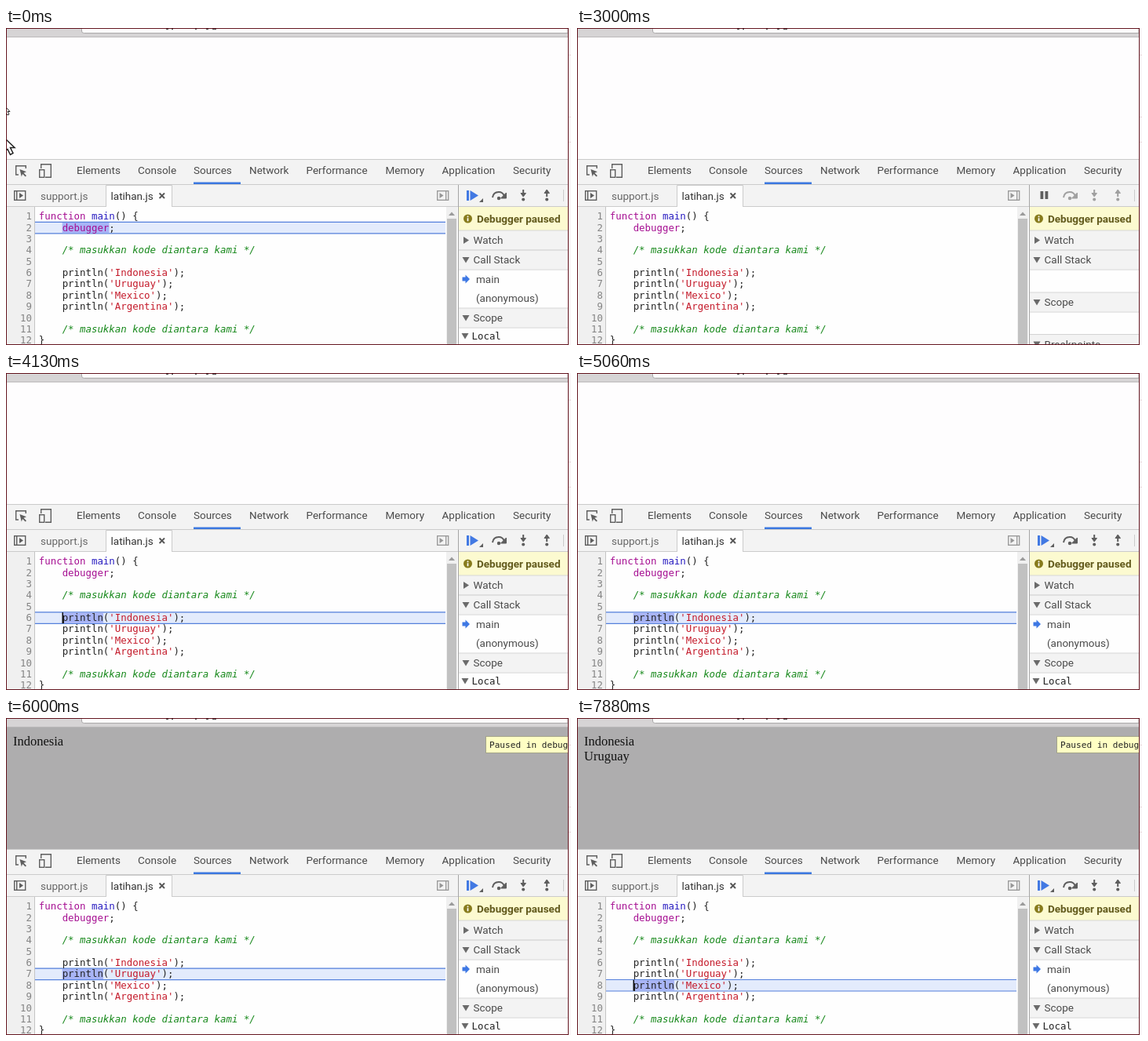
These frames come from a looping animation (720 px wide and 404 px high, 8000 ms). An HTML page:

```html
<!DOCTYPE html>
<html lang="id">
<head>
<meta charset="utf-8">
<title>Debugger stepping</title>
<style>
html, body { margin: 0; width: 100%; height: 100%; overflow: hidden; background: #fff; }
svg { display: block; width: 720px; height: 404px; }
text { white-space: pre; }
.ui { font: 13.5px Roboto, sans-serif; fill: #4a4a4a; }
.code { font: 12.4px "DejaVu Sans Mono", monospace; fill: #222; }
.page { font: 16.5px "Liberation Serif", serif; fill: #111; }
.num { fill: #848484; text-anchor: end; }
.key { fill: #a50d91; }
.def { fill: #261ac0; }
.str { fill: #c41a2a; }
.note { fill: #16881a; font-style: italic; }
</style>
</head>
<body>
<svg viewBox="0 0 720 404">
  <defs><clipPath id="window"><rect width="716" height="404"/></clipPath></defs>
  <rect width="720" height="404" fill="#fdfbfc"/>
  <path d="M717 34.5h3M717 113.5h3M717 145.5h3" stroke="#ead9dc"/>
  <g clip-path="url(#window)">
    <rect id="page" y="11" width="716" height="156"/>
    <rect width="716" height="12" fill="#d6d4d5"/>
    <path d="M96.500 0V4q0 2.500 3 2.500H716V0Z" fill="#fefefe" stroke="#aaa8a9"/>
    <path d="M0 11.500H716" stroke="#bcbabb"/>
    <path d="M204 1.500h3M211 1.500h2M241 1.500h2M255 1.500h3M263 1.500h5" stroke="#555" stroke-width="1.500"/>
    <g id="output" class="page"></g>
    <g id="notice">
      <rect x="611.500" y="23.500" width="130" height="21" fill="#ffffc4" stroke="#a4a48a"/>
      <text class="code" x="616" y="38" style="font-size:11.100px">Paused in debugger</text>
    </g>

    <rect y="167" width="716" height="61" fill="#f3f3f3"/>
    <path d="M0 167.500H716M0 199.500H716M0 227.500H716" stroke="#cbcbcb"/>
    <g id="tabs" class="ui"></g>
    <rect x="239" y="196.500" width="60" height="2.500" fill="#3b78e0"/>
    <g fill="none" stroke="#5e5e5e" stroke-width="1.400">
      <path d="M16 187h-3.300V175.700H25.300V179"/>
      <path d="M17.500 180l8.500 3.300-3.500 1.400 3.500 3.600-1.300 1.300-3.600-3.600-1.300 3.400z" fill="#5e5e5e" stroke="none"/>
      <path d="M44.700 179V173.700H57.300V190.300H50"/>
      <rect x="42.700" y="180.700" width="6" height="9.600" fill="#f3f3f3"/>
      <rect x="10.700" y="207.700" width="14" height="11.600"/>
      <path d="M13.700 208v11"/><path d="M17 210l5 3.500-5 3.500z" fill="#5e5e5e" stroke="none"/>
    </g>
    <g fill="none" stroke="#969696" stroke-width="1.300">
      <rect x="549.700" y="207.700" width="14" height="11.600"/>
      <path d="M560.700 208v11"/><path d="M552.500 210l5 3.500-5 3.500z" fill="#969696" stroke="none"/>
    </g>
    <path d="M127.500 228V200.500H211.500V228" fill="#fefefe" stroke="#cbcbcb"/>
    <text class="ui" x="44" y="219" style="fill:#666">support.js</text>
    <text class="ui" x="133.500" y="219" style="fill:#333">latihan.js</text>
    <path d="M195.500 210.500l6.500 6.500m0-6.500l-6.500 6.500" stroke="#555" stroke-width="1.800"/>

    <rect y="228" width="576" height="176" fill="#fefefe"/>
    <rect y="228" width="36" height="176" fill="#f0f0f0"/>
    <path d="M36.500 228V404" stroke="#c4c4c4"/>
    <g id="marker">
      <rect x="37" y="-7.500" width="523" height="15" fill="#e3ebfc"/>
      <path d="M37 -7H560M37 7.500H560" stroke="#5480dc" stroke-width="1.200"/>
      <rect id="selection" x="71.700" y="-6.300" height="13.200" fill="#a8b4f6"/>
    </g>
    <g id="source" class="code"></g>
    <rect id="caret" x="71.500" width="1.500" height="14" fill="#111"/>
    <rect x="561" y="228" width="14" height="176" fill="#f0f0f0"/>
    <path d="M564 239h8l-4-4.500z" fill="#9a9a9a"/>
    <rect x="562" y="243" width="12" height="161" fill="#c1c1c1"/>

    <rect x="576" y="228" width="140" height="176" fill="#fefefe"/>
    <path d="M576.500 200V404" stroke="#a5a5a5"/>
    <g id="resume">
      <path d="M587 207h3v13h-3zM591.500 207l10.500 6.500-10.500 6.500z" fill="#4279e3"/>
      <path d="M608 217v5h-5z" fill="#5e5e5e"/>
    </g>
    <path id="pause" d="M590.500 208h3.800v10h-3.800zM596.500 208h3.800v10h-3.800z" fill="#5e5e5e"/>
    <g id="steps" stroke-width="2">
      <path d="M620 216q1-7 8-7 5 0 7 5" fill="none"/>
      <path d="M637.500 210v7h-7zM656 210.500h6.500l-3.300 4.500zM686 210.500h6.500l-3.300-4.500z" stroke-width="1"/>
      <path d="M659.200 206v6M689.200 209v6" stroke-width="2"/>
      <g stroke="none"><circle cx="628" cy="217" r="2.200"/><circle cx="659.200" cy="218.500" r="2"/><circle cx="689.200" cy="218.500" r="2"/></g>
    </g>
    <path d="M710.500 206v15" stroke="#cbcbcb"/>
    <rect x="577" y="228" width="139" height="30" fill="#fcfad0"/>
    <circle cx="588.500" cy="243" r="5.500" fill="#877b1c"/>
    <path d="M588.500 239.500v1.700M588.500 242.300v4" stroke="#fff" stroke-width="1.700"/>
    <text class="ui" x="600" y="247.500" style="font-weight:700;fill:#625a1c">Debugger paused</text>
    <g id="pausedPanel"></g>
    <g id="runningPanel"></g>

    <g id="pointers" fill="#fff" stroke="#222" stroke-width="1.500">
      <path d="M-2 140L11 152.500H5.500L9 159.500 5.500 161.500 2 154.500-2 158Z"/>
      <path d="M-1 100L5 106.500H2L4 110 2 111-1 107Z" stroke-width="1"/>
    </g>
  </g>
  <path d="M.500 0V404M0 .500H717M716.500 0V404M0 403.500H717" stroke="#651721" fill="none"/>
</svg>
<script>
const LOOP = 8000, TICK = 187.5, PITCH = 14.36, CHAR = 7.465;
const $ = id => document.getElementById(id);
const lineY = n => 240 + PITCH * (n - 1);
const label = (x, y, str, cls = "ui") => `<text class="${cls}" x="${x}" y="${y}">${str}</text>`;
const span = (cls, str) => `<tspan class="${cls}">${str}</tspan>`;
const show = (id, on) => $(id).setAttribute("visibility", on ? "visible" : "hidden");

const countries = ["Indonesia", "Uruguay", "Mexico", "Argentina"];
const note = "    " + span("note", "/* masukkan kode diantara kami */");
const lines = [
  `${span("key", "function")} ${span("def", "main")}() {`,
  `    ${span("key", "debugger")};`,
  "", note, "",
  ...countries.map(c => `    println(${span("str", `'${c}'`)});`),
  "", note, "}"
];
$("source").innerHTML = lines.map((line, i) => {
  const y = lineY(i + 1) + 4.3;
  return label(33, y, i + 1, "num") + `<text x="41.8" y="${y}">${line}</text>`;
}).join("");

$("tabs").innerHTML = [
  [90, "Elements"], [168, "Console"], [239, "Sources"], [310, "Network"],
  [382.5, "Performance"], [483.5, "Memory"], [555.5, "Application"], [646, "Security"]
].map(([x, name]) => label(x, 186, name)).join("");

const fold = (x, y, open) =>
  `<path d="${open ? `M${x - 4.5} ${y - 3.5}h9l-4.5 7.5z` : `M${x - 3} ${y - 4.5}v9l7-4.5z`}" fill="#6a6a6a"/>`;
const section = (y, title, open = true) =>
  `<rect x="577" y="${y - 12}" width="139" height="24" fill="#f3f3f3"/>` +
  `<path d="M577 ${y - 12.5}h139M577 ${y + 12.5}h139" stroke="#d4d4d4"/>` +
  fold(586, y, open) + label(595.5, y + 4.5, title);

const stackHead = section(270.5, "Watch", false) + section(295.5, "Call Stack");
$("pausedPanel").innerHTML = stackHead +
  `<path d="M581.500 317.500h4v-3l5.500 5.500-5.500 5.500v-3h-4z" fill="#3e78e4"/>` +
  label(599, 324.5, "main") + label(599, 349, "(anonymous)") +
  section(369.5, "Scope") + fold(585, 392.5, true) + label(593.5, 396.5, "Local", "code");
$("runningPanel").innerHTML = stackHead + section(349.5, "Scope") + section(403, "Breakpoints");

// Each stop: when it starts, highlighted line (0 while running), caret start, printed rows.
const stops = [
  { at: 0, line: 2, blink: 345, rows: 0 },
  { at: 3000, line: 0, rows: 0 },
  { at: 3187, line: 6, blink: 3100, rows: 0 },
  { at: 5250, line: 0, rows: 1 },
  { at: 5437, line: 7, blink: 5350, rows: 1 },
  { at: 7500, line: 0, rows: 2 },
  { at: 7687, line: 8, blink: 7600, rows: 2 }
];

function render(ms) {
  const t = Math.floor((ms % LOOP) / TICK) * TICK;
  const { line, blink, rows } = stops.filter(s => s.at <= t).pop();
  const paused = line > 0;

  show("marker", paused);
  show("resume", paused);
  show("pausedPanel", paused);
  show("pause", !paused);
  show("runningPanel", !paused);
  const tint = paused ? "#5e5e5e" : "#a0a0a0";
  $("steps").setAttribute("fill", tint);
  $("steps").setAttribute("stroke", tint);

  if (paused) {
    $("marker").setAttribute("transform", `translate(0 ${lineY(line)})`);
    $("selection").setAttribute("width", CHAR * (line === 2 ? 8 : 7));
    $("caret").setAttribute("y", lineY(line) - 6.7);
  }
  show("caret", paused && (t - blink + LOOP) % 1000 < 500);

  $("page").setAttribute("fill", rows ? "#aeadae" : "#fefdfe");
  show("notice", rows > 0);
  $("output").innerHTML = countries.slice(0, rows)
    .map((c, i) => label(9, 35 + 18.5 * i, c, "page")).join("");
  show("pointers", t < 1120);
}

const start = performance.now();
function frame() {
  render(performance.now() - start);
  requestAnimationFrame(frame);
}
frame();
</script>
</body>
</html>
```
